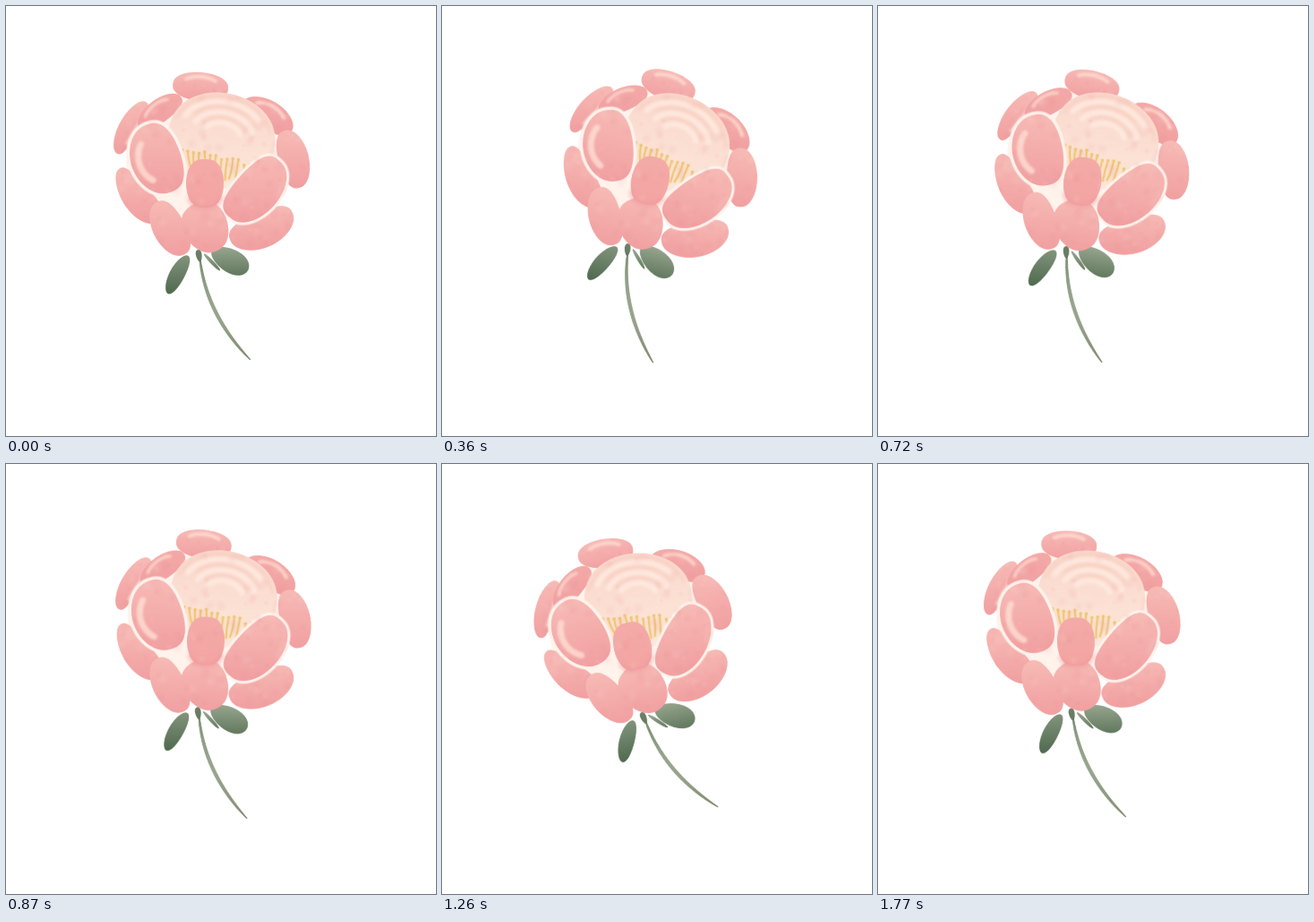
Write an HTML page with a canvas that moves like this. It is 480 px wide and 480 px high and loops after 1800 ms.

```html
<!DOCTYPE html>
<html>
<head>
<meta charset="utf-8">
<style>
html, body { margin: 0; width: 100%; height: 100%; overflow: hidden; background: #fff; }
canvas { display: block; }
</style>
</head>
<body>
<canvas id="stage" width="480" height="480"></canvas>
<script>
const SIZE = 480, LOOP = 1800, SCALE = 2, RAD = Math.PI / 180, SWING = 14.2 * RAD;
const LIGHT = '#f7bab5', DARK = '#f1a0a1', CREAM = '#fff3ec';
const view = document.getElementById('stage').getContext('2d');
const art = document.createElement('canvas');
art.width = art.height = SIZE * SCALE;
const g = art.getContext('2d');
g.scale(SCALE, SCALE);
g.lineCap = g.lineJoin = 'round';

let seed = 7;
const rand = () => (seed = seed * 16807 % 2147483647) / 2147483647;

// Arc of a bent, tapered oval; from and to are angles around it, k shrinks it.
function oval(s, from = 0, to = 2 * Math.PI, k = 1) {
  const path = new Path2D(), steps = 72;
  const cosT = Math.cos(s.turn * RAD), sinT = Math.sin(s.turn * RAD);
  for (let i = 0; i <= steps; i++) {
    const u = from + (to - from) * i / steps, c = Math.cos(u), n = Math.sin(u);
    const along = s.a * k * c;
    const across = s.b * k * Math.sign(n) * Math.abs(n) ** s.point * (1 + s.taper * c) + s.bend * n * n;
    path.lineTo(s.x + along * cosT - across * sinT, s.y + along * sinT + across * cosT);
  }
  return path;
}

function stroke(path, color, width, blur = 0) {
  g.filter = blur ? `blur(${blur * SCALE}px)` : 'none';
  g.strokeStyle = color;
  g.lineWidth = width;
  g.stroke(path);
  g.filter = 'none';
}

// Watercolour oval: a is half its length, b half its width, glow the lit side.
function petal(x, y, a, b, turn, look = {}) {
  const s = { x, y, a, b, turn, bend: 0, taper: 0, point: 0.85, top: LIGHT, low: DARK, glow: 0, halo: 0, ...look };
  const path = oval(s);
  const reach = Math.hypot(a * Math.sin(turn * RAD), b * Math.cos(turn * RAD));
  const wash = g.createLinearGradient(x, y - reach, x, y + reach);
  wash.addColorStop(0, s.top);
  wash.addColorStop(1, s.low);
  if (s.halo) stroke(path, CREAM, s.halo, 0.4);
  g.save();
  g.fillStyle = wash;
  g.fill(path);
  g.clip(path);
  if (s.glow) stroke(oval(s, s.glow * 0.7, s.glow * 2.5, 0.68), 'rgba(255,226,214,.75)', b / 4, 1.4);
  g.restore();
  return s;
}

function drawStem() {
  const bez = (p, q, r, t) => (1 - t) ** 2 * p + 2 * t * (1 - t) * q + t * t * r;
  for (let t = 0; t <= 1; t += 0.004) {
    g.fillStyle = `hsl(${100 - 15 * t} 11% ${47 + 13 * Math.sin(Math.PI * t)}%)`;
    g.beginPath();
    g.arc(bez(216, 221, 273, t), bez(276, 342, 395, t), 0.5 + 1.5 * Math.sin(Math.PI * t) ** 0.6, 0, 7);
    g.fill();
  }
  const leaf = { point: 1, top: '#98a690', low: '#637a5f' };
  petal(215.5, 279, 7, 3.2, 80, { ...leaf, top: '#6d8067', taper: -0.3 });
  petal(230, 286, 13, 2, 46, leaf);
  petal(192, 300, 24, 8.5, 118, { ...leaf, low: '#4f6a4e', top: '#82947c', bend: 1 });
  petal(250, 284, 23, 13, 29, { ...leaf, taper: 0.15 });
}

function drawOuterPetals() {
  petal(222, 168, 88, 70, 0, { top: CREAM, low: CREAM });
  petal(217, 90, 31, 16, 5, { glow: -1 });
  petal(140, 136, 33, 11, -61, { bend: -3, glow: 1 });
  petal(172, 119, 29, 13, -37, { bend: -2, glow: -1, top: '#f3a9a7' });
  petal(291, 124, 32, 16, 30, { bend: -3, glow: -1, top: '#f4a9a7' });
  petal(319, 171, 33, 17, 76, { bend: -2 });
  petal(149, 211, 37, 16, 52, { bend: 4, taper: 0.15 });
  petal(285, 246, 38, 20, -24, { bend: 4 });
}

function drawCup() {
  const cup = petal(240, 150, 60, 53, 12, { top: '#fad7cb', low: '#fde7da' });
  for (let i = 0; i < 6; i++) {
    const tint = i % 2 ? 'rgba(255,236,226,.8)' : 'rgba(247,200,186,.55)';
    stroke(oval(cup, -2.9 + rand() * 0.5, -0.9 + rand() * 0.6, 0.92 - i * 0.11), tint, 3 + i % 2 * 3, 1.5);
  }
}

function drawStamens() {
  const count = 15;
  for (let i = 0; i < count; i++) {
    const s = i / (count - 1), x = 184 + 88 * s;
    const tip = 150 + 22 * s + rand() * 8, base = 179 + 16 * s + rand() * 4;
    const lean = 7 * (1 - 2 * s) + rand() * 5 - 2;
    const thread = new Path2D();
    thread.moveTo(x, tip);
    thread.quadraticCurveTo(x + rand() * 6 - 3, (tip + base) / 2, x + lean, base);
    stroke(thread, 'rgba(244,208,140,.55)', 3.6, 0.7);
    stroke(thread, 'rgba(236,190,98,.75)', 1.7, 0.3);
    g.fillStyle = '#efc777';
    g.beginPath();
    g.arc(x, tip, 1.7, 0, 7);
    g.fill();
  }
}

function drawFrontPetals() {
  petal(171, 170, 40, 28, 70, { bend: 4, glow: 1, halo: 7 });
  petal(277, 204, 42, 25, -48, { bend: 4, halo: 6, point: 0.75 });
  petal(184, 248, 33, 18, 62, { bend: 2 });
  petal(223, 247, 29, 25, 62, { taper: -0.1 });
  petal(222, 198, 27, 21, 90, { top: '#f4aba8', low: '#f3a4a3', point: 0.7 });
  stroke(oval({ x: 222, y: 198, a: 27, b: 21, turn: 90, bend: 0, taper: 0, point: 0.7 }, -0.9, 0.9), 'rgba(238,150,153,.6)', 4, 2);
}

// Faint pigment blooms, kept inside the painted area.
function drawBlooms() {
  g.globalCompositeOperation = 'source-atop';
  for (let i = 0; i < 260; i++) {
    const x = 120 + rand() * 220, y = 70 + rand() * 200, r = 2 + rand() * 6;
    const tone = rand() < 0.5 ? '255,238,228' : '225,125,130';
    const bloom = g.createRadialGradient(x, y, 0, x, y, r);
    bloom.addColorStop(0, `rgba(${tone},.1)`);
    bloom.addColorStop(1, `rgba(${tone},0)`);
    g.fillStyle = bloom;
    g.fillRect(x - r, y - r, 2 * r, 2 * r);
  }
  g.globalCompositeOperation = 'source-over';
}

drawStem();
drawOuterPetals();
drawCup();
drawStamens();
drawFrontPetals();
drawBlooms();

const start = performance.now();
view.imageSmoothingQuality = 'high';

function frame() {
  const t = (performance.now() - start) % LOOP / LOOP;
  view.setTransform(1, 0, 0, 1, 0, 0);
  view.clearRect(0, 0, SIZE, SIZE);
  view.translate(SIZE / 2, SIZE / 2);
  view.rotate(SWING * Math.sin(2 * Math.PI * t));
  view.drawImage(art, -SIZE / 2, -SIZE / 2, SIZE, SIZE);
  requestAnimationFrame(frame);
}
frame();
</script>
</body>
</html>
```
